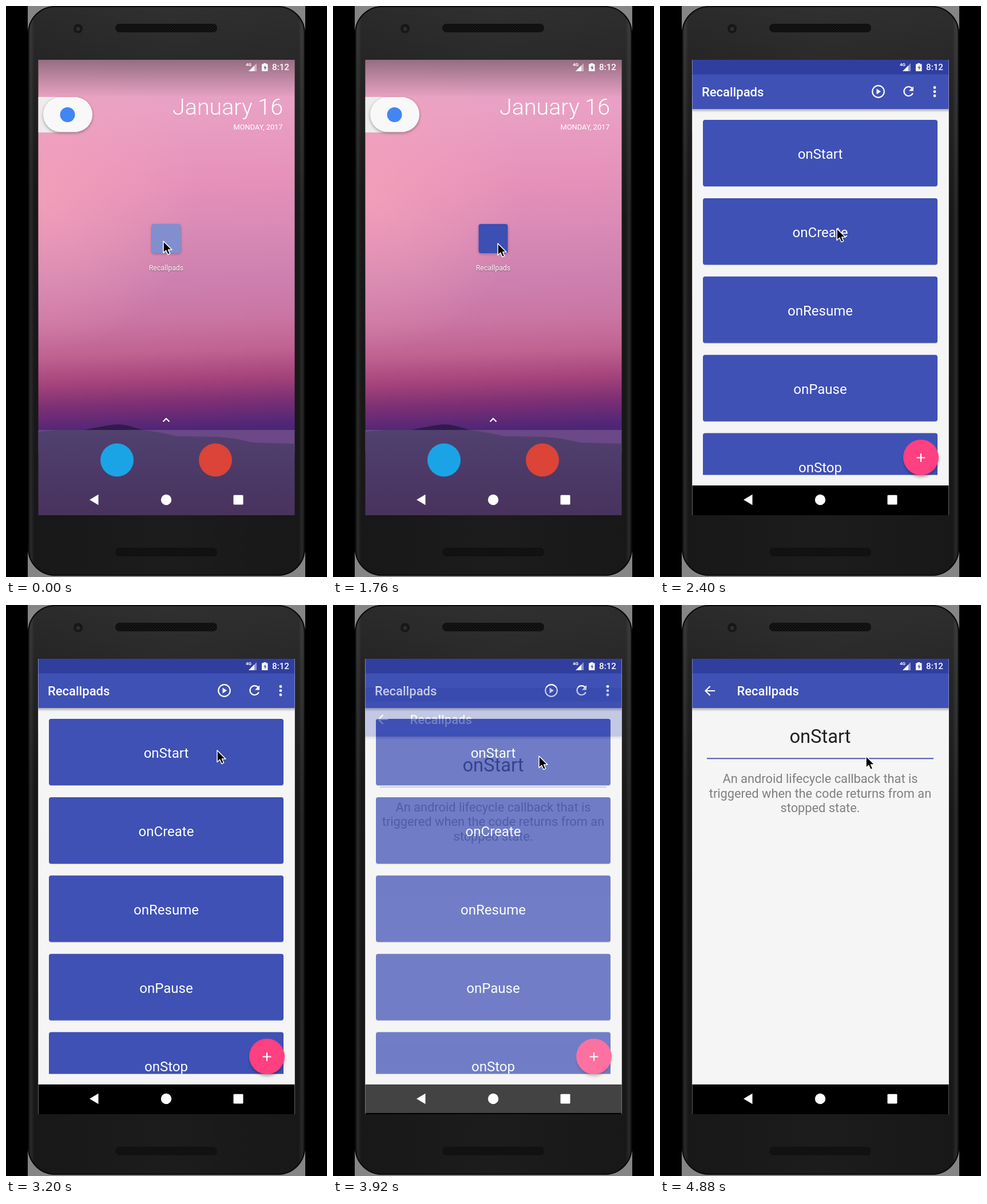
Animation, 561 px wide and 998 px high, one loop 4960 ms. Source, as an HTML page:

```html
<!DOCTYPE html>
<html lang="en">
<head>
<meta charset="utf-8">
<title>Phone demo</title>
<style>
html, body { margin: 0; width: 100%; height: 100%; overflow: hidden; background: #000; }
svg { display: block; width: 100%; height: 100%; font-family: Roboto, sans-serif; }
.mid { text-anchor: middle; }
.end { text-anchor: end; }
.title { font-size: 22px; font-weight: 500; fill: #fff; }
.line { fill: none; stroke: #fff; stroke-width: 2.2; }
</style>
</head>
<body>
<svg viewBox="0 0 561 998">
  <defs>
    <linearGradient id="body" x1="0" x2="1" y1="0" y2="0">
      <stop offset="0" stop-color="#0c0c0c"/><stop offset=".011" stop-color="#2a2a2a"/>
      <stop offset=".024" stop-color="#181818"/><stop offset=".5" stop-color="#1c1c1c"/>
      <stop offset=".976" stop-color="#181818"/><stop offset=".989" stop-color="#2a2a2a"/>
      <stop offset="1" stop-color="#0c0c0c"/>
    </linearGradient>
    <linearGradient id="sheen" gradientUnits="userSpaceOnUse" x1="310" y1="0" x2="270" y2="340">
      <stop offset="0" stop-color="#fff" stop-opacity=".09"/>
      <stop offset="1" stop-color="#fff" stop-opacity="0"/>
    </linearGradient>
    <linearGradient id="sky" gradientUnits="userSpaceOnUse" x1="268" y1="94" x2="292" y2="740">
      <stop offset="0" stop-color="#e2a5c5"/><stop offset=".14" stop-color="#e9a0c4"/>
      <stop offset=".32" stop-color="#e692bb"/><stop offset=".45" stop-color="#da8bb6"/>
      <stop offset=".6" stop-color="#cd80af"/><stop offset=".7" stop-color="#ca76a4"/>
      <stop offset=".79" stop-color="#c06391"/><stop offset=".87" stop-color="#a3427a"/>
      <stop offset=".93" stop-color="#7c2f74"/><stop offset="1" stop-color="#4d2677"/>
    </linearGradient>
    <radialGradient id="glow" gradientUnits="userSpaceOnUse" cx="60" cy="335" r="270">
      <stop offset="0" stop-color="#f8a6b8" stop-opacity=".65"/>
      <stop offset="1" stop-color="#f8a6b8" stop-opacity="0"/>
    </radialGradient>
    <linearGradient id="scrim" x1="0" x2="0" y1="0" y2="1">
      <stop offset="0" stop-opacity=".34"/><stop offset="1" stop-opacity="0"/>
    </linearGradient>
    <linearGradient id="land" x1="0" x2="0" y1="0" y2="1">
      <stop offset="0" stop-color="#51416f"/><stop offset=".5" stop-color="#4c3967"/>
      <stop offset="1" stop-color="#49335d"/>
    </linearGradient>
    <linearGradient id="fall" x1="0" x2="0" y1="0" y2="1">
      <stop offset="0" stop-opacity=".3"/><stop offset="1" stop-opacity="0"/>
    </linearGradient>
    <pattern id="mesh" width="5" height="5" patternUnits="userSpaceOnUse">
      <rect width="5" height="5" fill="#0e0e0e"/>
      <circle cx="1.2" cy="1.2" r=".8" fill="#262626"/><circle cx="3.7" cy="3.7" r=".8" fill="#262626"/>
    </pattern>
    <filter id="soft" x="-30%" y="-30%" width="160%" height="160%"><feGaussianBlur stdDeviation="2.5"/></filter>
    <clipPath id="screen"><rect x="56.5" y="94" width="448" height="796"/></clipPath>
    <clipPath id="reveal"><rect id="hole"/></clipPath>
    <clipPath id="scroll"><rect x="56" y="180" width="449" height="639.5"/></clipPath>
  </defs>

  <rect width="561" height="998"/>
  <rect x="38" width="485" height="998" fill="#858585"/>
  <rect x="38" y="0" width="485" height="996" rx="48" fill="url(#body)"/>
  <rect x="38" y="0" width="485" height="996" rx="48" fill="url(#sheen)"/>
  <rect x="39" y="1" width="483" height="994" rx="47" fill="none" stroke="#0a0a0a" stroke-width="2"/>
  <rect x="191" y="31" width="178" height="15" rx="7" fill="url(#mesh)"/>
  <rect x="191" y="947" width="178" height="15" rx="7" fill="url(#mesh)"/>
  <circle cx="126" cy="39.5" r="8" fill="#171717"/>
  <circle cx="126" cy="40" r="3.5" fill="#2a3031"/>

  <g clip-path="url(#screen)">
    <g id="home">
      <rect x="56" y="94" width="449" height="650" fill="url(#sky)"/>
      <rect x="56" y="94" width="449" height="650" fill="url(#glow)"/>
      <rect x="56" y="94" width="449" height="66" fill="url(#scrim)"/>
      <rect x="56" y="741" width="449" height="40" fill="#6b4886"/>
      <path d="M132 742Q165 735 185 732Q200 730 215 734L242 742Z" fill="#321a4b"/>
      <path d="M56 744L90 741H240L272 746L300 752L370 753L400 756L432 763L505 765V890H56Z" fill="url(#land)"/>
      <rect x="56" y="159" width="70" height="62" fill="#ececec"/>
      <rect x="65" y="161" width="86" height="61" rx="30.5" opacity=".35" filter="url(#soft)"/>
      <rect x="65" y="159.5" width="86" height="60.5" rx="30" fill="#f8f8f8"/>
      <circle cx="107.5" cy="190" r="13" fill="#4285f4"/>
      <g fill="#fff">
        <text class="end" x="484" y="190" font-size="39.4" font-weight="300">January 16</text>
        <text class="end" x="483.5" y="216" font-size="12.8">MONDAY, 2017</text>
        <text class="mid" x="280" y="461.5" font-size="12.4" style="text-shadow:0 1px 2px #0006">Recallpads</text>
      </g>
      <rect x="255" y="383" width="50" height="50" rx="4" opacity=".3" filter="url(#soft)"/>
      <rect x="254.5" y="381" width="51" height="51" rx="4" fill="#3c4fb2"/>
      <rect id="press" x="254.5" y="381" width="51" height="51" rx="4" fill="#fff"/>
      <path class="line" d="M274.5 726.5L280 721L285.5 726.5"/>
      <circle cx="194" cy="793.5" r="29" fill="#1aa4e6"/>
      <circle cx="366" cy="793.5" r="29" fill="#db4437"/>
    </g>

    <g id="app" clip-path="url(#reveal)">
      <rect x="56" y="94" width="449" height="796" fill="#f5f5f5"/>
      <g id="list">
        <rect x="56" y="94" width="449" height="796" fill="#f5f5f5"/>
        <g id="cards" clip-path="url(#scroll)"></g>
        <g class="bars"></g>
        <text class="title" x="73" y="158">Recallpads</text>
        <circle class="line" cx="381.5" cy="149.5" r="10.3"/>
        <path d="M378.5 144.5V154.5L386 149.5Z" fill="#fff"/>
        <path class="line" d="M440.5 144A8 8 0 1 0 441.8 152.3" stroke-width="2.4"/>
        <path d="M443 140.5V148.5H435Z" fill="#fff"/>
        <g fill="#fff">
          <circle cx="480" cy="142.5" r="2.4"/><circle cx="480" cy="149.7" r="2.4"/><circle cx="480" cy="157" r="2.4"/>
        </g>
        <circle cx="456" cy="793" r="30" opacity=".35" filter="url(#soft)"/>
        <circle cx="456" cy="789" r="31" fill="#ff4081"/>
        <path class="line" d="M448.5 789.5H463.5M456 782V797"/>
      </g>
    </g>

    <g id="detail">
      <rect x="56" y="94" width="449" height="796" fill="#f5f5f5"/>
      <g class="bars"></g>
      <path class="line" d="M96 150H80M87.5 142L79.5 150L87.5 158"/>
      <text class="title" x="134.5" y="158">Recallpads</text>
      <text class="mid" x="280" y="241" font-size="32.7" fill="#212121">onStart</text>
      <rect x="82" y="267.3" width="396" height="2" fill="#5058ae"/>
      <g class="mid" font-size="21.8" fill="#808080">
        <text x="280" y="311">An android lifecycle callback that is</text>
        <text x="280" y="336.5">triggered when the code returns from an</text>
        <text x="280" y="362">stopped state.</text>
      </g>
    </g>

    <g fill="#fff">
      <text x="419" y="105" font-size="8" font-weight="700">4G</text>
      <path d="M424 114L434 104V114Z"/>
      <path d="M434 104L438 100V114H434Z" opacity=".45"/>
      <path d="M447 101.5H450V100H454.5V101.5H457.5V114H447Z"/>
      <path d="M453.5 103.5L450 108H452V112L455.5 107H453.5Z" fill="#6a6a94"/>
      <text x="465" y="112.3" font-size="15.2" font-weight="500">8:12</text>
      <path d="M146 863L161.5 853.8V872.2Z"/>
      <circle cx="280" cy="863" r="9.2"/>
      <rect x="397.5" y="854.8" width="17" height="16.7" rx="1.5"/>
    </g>
  </g>

  <path id="cursor" d="M0 0V20.5L4.7 16.3L7.9 23.5L11.6 21.9L8.6 15H15Z" stroke="#fff" stroke-width="1.5" stroke-linejoin="round"/>
</svg>

<script>
const LOOP = 4960, STEP = 80;
const $ = id => document.getElementById(id);
const clamp = v => Math.max(0, Math.min(1, v));
const out = (u, n) => 1 - (1 - u) ** n;
const mix = (a, b, u) => a + (b - a) * u;
const set = (el, attrs) => { for (const k in attrs) el.setAttribute(k, attrs[k]); };

// Status bar, toolbar and navigation bar shared by both windows
for (const g of document.querySelectorAll('.bars')) g.innerHTML = `
  <rect x="56" y="180" width="449" height="6" fill="url(#fall)"/>
  <rect x="56" y="94" width="449" height="26" fill="#303f9f"/>
  <rect x="56" y="119.5" width="449" height="60.5" fill="#3f51b5"/>
  <rect x="56" y="838" width="449" height="52"/>`;

$('cards').innerHTML = ['onStart', 'onCreate', 'onResume', 'onPause', 'onStop'].map((name, i) => {
  const y = 199 + i * 136.9;
  return `<rect x="75" y="${y + 1}" width="410" height="116" rx="4" fill="#aab0c8"/>
    <rect x="75" y="${y}" width="410" height="116" rx="4" fill="#3f51b5"/>
    <text class="mid" x="280" y="${y + 68}" font-size="24" fill="#fff">${name}</text>`;
}).join('');

// time, x, y of the pointer tip
const path = [
  [0, 275, 411], [880, 273, 410], [1400, 273, 410], [1760, 288, 415], [1920, 296, 415],
  [2200, 298, 414], [3000, 369, 254], [3300, 369, 254], [3700, 360, 264], [LOOP, 360, 264]
];

function pointer(t) {
  const i = path.findIndex(p => p[0] > t);
  const [t0, x0, y0] = path[i - 1], [t1, x1, y1] = path[i];
  const u = (t - t0) / (t1 - t0), e = u * u * (3 - 2 * u);
  return [mix(x0, x1, e), mix(y0, y1, e)];
}

function draw(t) {
  set($('press'), { opacity: 0.36 * clamp(1 - t / 1760) });

  // The list window grows out of the launcher icon
  const u = clamp((t - 1785) / 330), p = out(u, 3);
  const shift = 50 * (1 - p), wide = clamp(u * 2.5);
  const top = mix(382, 94, p), left = mix(255, 56, wide);
  set($('hole'), {
    x: left, y: top - shift,
    width: mix(305, 505, wide) - left, height: mix(432, 890, p) - top
  });
  set($('app'), { transform: `translate(0 ${shift})`, visibility: u > 0 ? 'visible' : 'hidden' });
  set($('list'), { opacity: out(u, 5) });

  // The detail window slides up while fading in
  const age = t - 3903;
  set($('detail'), {
    transform: `translate(0 ${64 * (1 - out(clamp(age / 350), 5))})`,
    opacity: out(clamp(age / 220), 4)
  });

  set($('cursor'), { transform: `translate(${pointer(t)})` });
}

const start = performance.now();
function tick() {
  const t = (performance.now() - start) % LOOP;
  draw(Math.floor(t / STEP) * STEP);
  requestAnimationFrame(tick);
}
tick();
</script>
</body>
</html>
```
